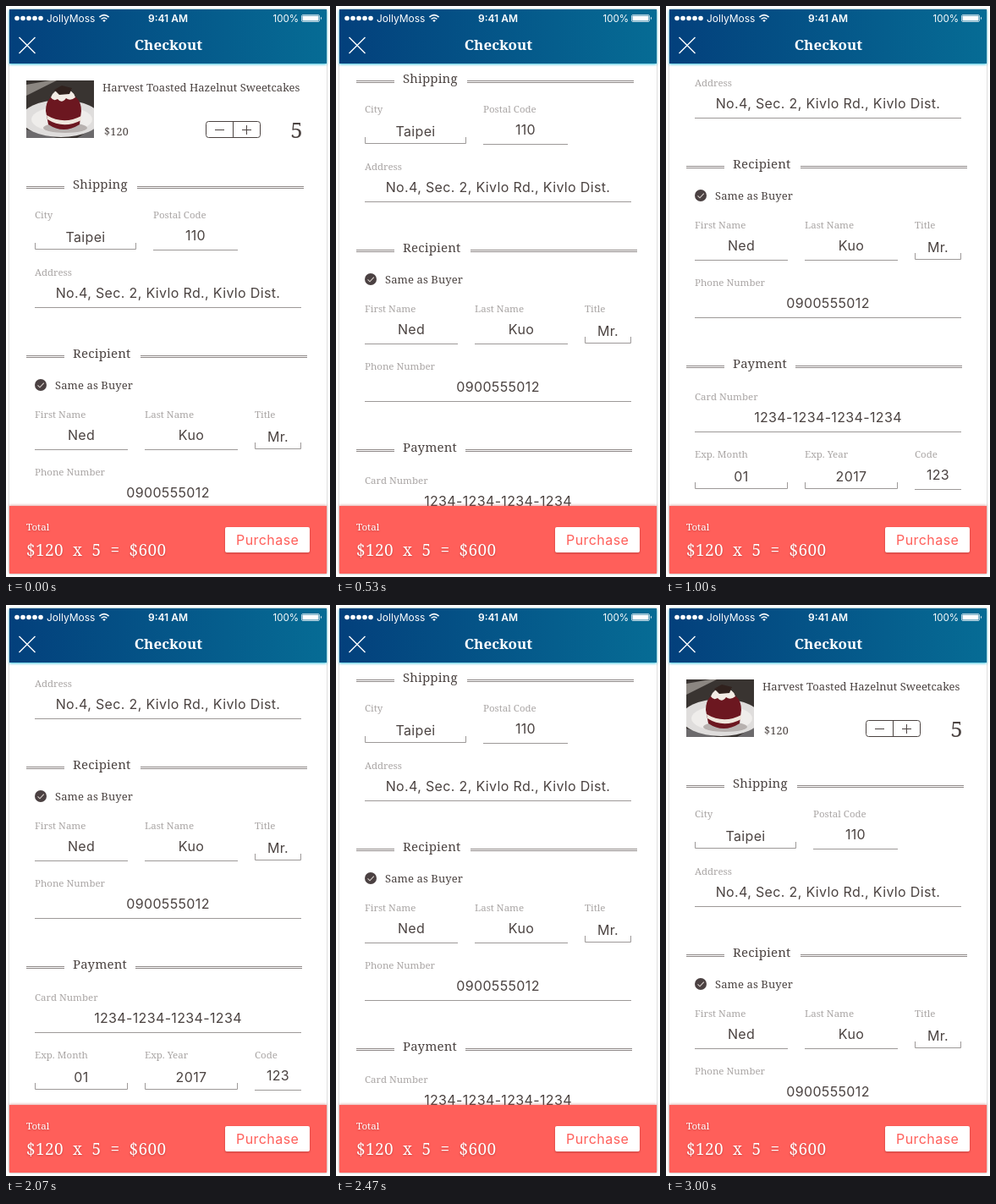
Animation, 383 px wide and 675 px high, one loop 4070 ms. Source, as an HTML page:

```html
<!DOCTYPE html>
<html lang="en">
<head>
<meta charset="utf-8">
<title>Checkout</title>
<style>
  html, body { margin: 0; width: 100%; height: 100%; overflow: hidden; background: #fff; }
  svg { display: block; width: 383px; height: 675px; }
  text { fill: #4b4341; }
  .serif { font-family: "Noto Serif", serif; }
  .sans { font-family: Inter, sans-serif; }
  .heading { font-size: 15px; letter-spacing: .15px; }
  .label { font-size: 11.5px; fill: #aaa6a5; }
  .value { font-size: 16px; letter-spacing: .35px; text-anchor: middle; }
  .item { font-size: 13px; }
  .price { font-size: 12.5px; letter-spacing: .26px; }
  .count { font-size: 26px; text-anchor: middle; }
  .line { fill: none; stroke: #9d9998; }
  .rule { fill: none; stroke: #8f8988; }
  .ink { fill: none; stroke: #4b4341; }
  .white text { fill: #fff; }
  .status { font-size: 12px; }
  .title { font-size: 17px; font-weight: 700; text-anchor: middle; }
  .total { font-size: 11.5px; }
  .sum { font-size: 19px; letter-spacing: .4px; word-spacing: 5.66px; }
  .white .buy { font-size: 16px; letter-spacing: .45px; text-anchor: middle; fill: #ff5f5a; }
  .card { filter: drop-shadow(0 0 1.2px rgba(0, 0, 0, .35)); }
  .head { filter: drop-shadow(0 1px 1.5px #35bfdc); }
  .bar { filter: drop-shadow(0 -1px 1.5px rgba(190, 70, 65, .45)); }
  .button { filter: drop-shadow(0 1px 1px rgba(120, 20, 20, .45)); }
  .total, .sum { filter: drop-shadow(0 1px 1px rgba(120, 20, 20, .4)); }
</style>
</head>
<body>
<svg viewBox="0 0 383 675">
  <defs>
    <linearGradient id="blue">
      <stop offset="0" stop-color="#03407c"/>
      <stop offset="1" stop-color="#066c95"/>
    </linearGradient>
    <clipPath id="view"><rect x="4" y="68" width="375" height="607"/></clipPath>
    <clipPath id="photo"><rect x="24" y="88" width="80" height="68"/></clipPath>
  </defs>

  <rect width="383" height="675" fill="#fff"/>
  <rect class="card" x="4" y="4" width="375" height="667" fill="#fff"/>

  <g clip-path="url(#view)">
    <g id="page">
      <g clip-path="url(#photo)">
        <rect x="24" y="88" width="80" height="68" fill="#393431"/>
        <path d="M24 93L52 88H60L24 106Z" fill="#8b8681"/>
        <path d="M24 156V146L60 156ZM104 156V144L84 156Z" fill="#6c6a6c"/>
        <ellipse cx="65" cy="133" rx="47" ry="22" fill="#dfdddc"/>
        <ellipse cx="66" cy="134" rx="36" ry="15" fill="#efedeb"/>
        <ellipse cx="70" cy="144" rx="26" ry="6" fill="#b7b1af"/>
        <path d="M47 124Q47 104 67 103Q89 104 89 124L87 140Q68 152 50 140Z" fill="#6c1720"/>
        <path d="M48 129Q68 141 89 130V135Q68 146 49 134Z" fill="#efe6dc"/>
        <path d="M53 108Q56 99 67 98Q80 99 82 108Q76 113 71 109Q66 116 61 110Q56 113 53 108Z" fill="#f2ece5"/>
        <path d="M57 99L66 94L78 97L75 104L63 105Z" fill="#30211d"/>
      </g>
      <text class="serif item" x="114" y="101">Harvest Toasted Hazelnut Sweetcakes</text>
      <text class="serif price" x="116" y="153">$120</text>
      <rect class="ink" x="236.5" y="136.5" width="64" height="19" rx="3"/>
      <path class="ink" d="M268.5 137V155M247 146.5H258M279 146.5H290M284.5 141V152"/>
      <text class="serif count" x="343.5" y="156">5</text>
      <circle cx="41" cy="448" r="7" fill="#4b4142"/>
      <path d="M37.5 448.3L40 450.8L44.8 445.6" fill="none" stroke="#d8d0cc" stroke-width="1.1"/>
      <text class="serif item" x="58" y="453" letter-spacing=".1">Same as Buyer</text>
    </g>
  </g>

  <g class="white">
    <g class="head"><rect x="4" y="4" width="375" height="64" fill="url(#blue)"/></g>
    <g id="dots" fill="#fff"></g>
    <text class="sans status" x="48" y="19">JollyMoss</text>
    <path d="M110.4 13.2Q116 8.2 121.6 13.2M112.6 15.5Q116 12.5 119.4 15.5" fill="none" stroke="#fff" stroke-width="1.6"/>
    <path d="M114.1 17Q116 15.6 117.9 17L116 19Z" fill="#fff"/>
    <text class="sans status" x="191.5" y="19" text-anchor="middle" font-weight="600">9:41 AM</text>
    <text class="sans" x="346" y="19" text-anchor="end" font-size="11.5">100%</text>
    <rect x="349.5" y="10.5" width="21" height="8" rx="1.5" fill="none" stroke="#fff" stroke-width=".7"/>
    <rect x="350.5" y="11.5" width="19" height="6" rx=".7" fill="#fff"/>
    <path d="M372 12.8Q374 14.5 372 16.2Z" fill="#fff"/>
    <path d="M15.5 37L34.5 56M34.5 37L15.5 56" stroke="#fff" stroke-width="1.4"/>
    <text class="serif title" x="192" y="52">Checkout</text>

    <rect class="bar" x="4" y="591" width="375" height="80" fill="#ff5f5a"/>
    <text class="serif total" x="24" y="620">Total</text>
    <text class="serif sum" x="24" y="650">$120 x 5 = $600</text>
    <rect class="button" x="259" y="616" width="100" height="30" rx="2" fill="#fff"/>
    <text class="sans buy" x="309.2" y="637">Purchase</text>
  </g>
</svg>
<script>
const page = document.getElementById("page");
const dots = document.getElementById("dots");

function add(parent, tag, attrs, text) {
  const el = document.createElementNS("http://www.w3.org/2000/svg", tag);
  for (const key in attrs) el.setAttribute(key, attrs[key]);
  if (text) el.textContent = text;
  parent.appendChild(el);
}

function section(name, y, right) {
  add(page, "text", { class: "serif heading", x: 79, y }, name);
  for (const dy of [-2.5, -0.5]) {
    add(page, "path", { class: "rule", d: `M24 ${y + dy}H69M${right} ${y + dy}h197` });
  }
}

// A select gets a bracket, a plain input an underline.
function field(label, value, x, y, width, select) {
  add(page, "text", { class: "serif label", x, y }, label);
  add(page, "text", { class: "sans value", x: x + width / 2, y: y + (select ? 28 : 26) }, value);
  const d = select
    ? `M${x + 0.5} ${y + 29}v7.5h${width - 1}v-7.5`
    : `M${x} ${y + 37.5}h${width}`;
  add(page, "path", { class: "line", d });
}

section("Shipping", 216, 155);
field("City", "Taipei", 34, 251, 120, true);
field("Postal Code", "110", 174, 251, 100);
field("Address", "No.4, Sec. 2, Kivlo Rd., Kivlo Dist.", 34, 319, 315);

section("Recipient", 416, 159);
field("First Name", "Ned", 34, 487, 110);
field("Last Name", "Kuo", 164, 487, 110);
field("Title", "Mr.", 294, 487, 55, true);
field("Phone Number", "0900555012", 34, 555, 315);

section("Payment", 652, 153);
field("Card Number", "1234-1234-1234-1234", 34, 690, 315);
field("Exp. Month", "01", 34, 758, 110, true);
field("Exp. Year", "2017", 164, 758, 110, true);
field("Code", "123", 294, 758, 55);

for (let i = 0; i < 5; i++) {
  add(dots, "circle", { cx: 13 + 7 * i, cy: 14.5, r: 2.8 });
}

const LOOP = 4070, TRAVEL = 224;

// Motion runs at 15 steps per second, each start rounded to 10 ms.
const stepStart = k => Math.round(k * 20 / 3) * 10;

function snap(t) {
  let k = Math.ceil(t * 15 / 1000);
  while (stepStart(k) > t) k--;
  return stepStart(k);
}

function ease(p) {
  p = Math.min(1, Math.max(0, p));
  return p < 0.5 ? 2 * p * p : 1 - 2 * (1 - p) * (1 - p);
}

function draw(time) {
  const t = snap(time % LOOP);
  const scroll = Math.round(TRAVEL * (ease(t / 1000) - ease((t - 2000) / 1000)));
  page.setAttribute("transform", `translate(0 ${-scroll})`);
}

const begin = performance.now();
function tick() {
  draw(performance.now() - begin);
  requestAnimationFrame(tick);
}
tick();
</script>
</body>
</html>
```
